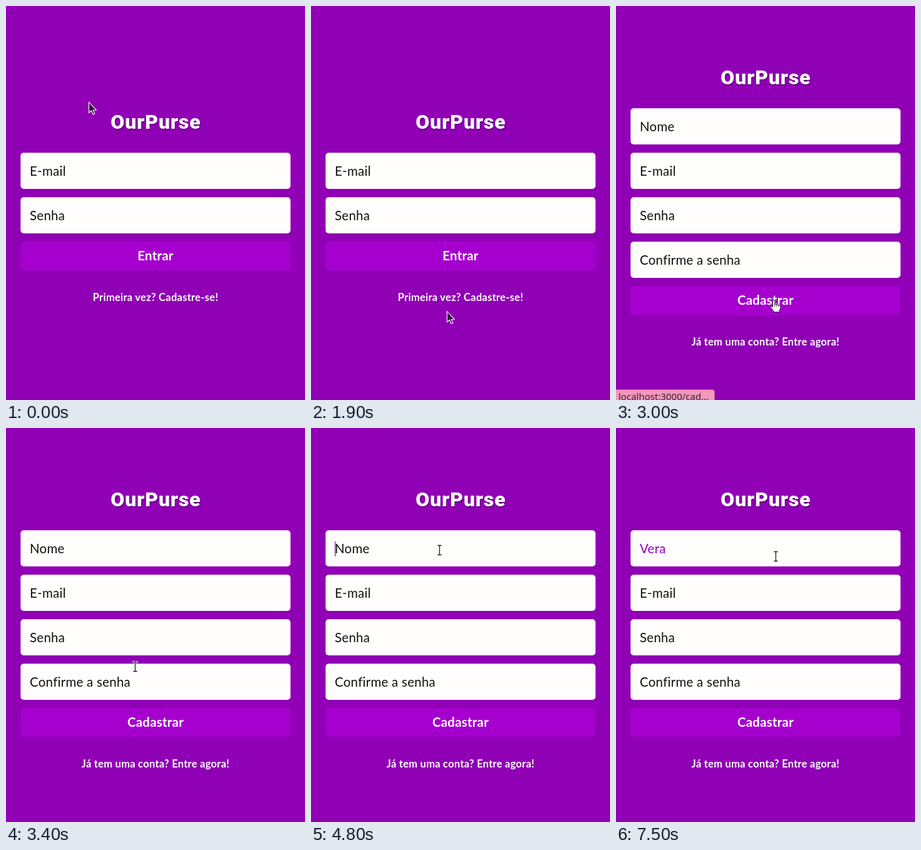
An HTML page that plays this animation: 478x629 px, repeating every 8 s.

```html
<!DOCTYPE html>
<html lang="pt-BR">
<head>
<meta charset="utf-8">
<title>OurPurse</title>
<style>
  html, body { margin: 0; width: 100%; height: 100%; overflow: hidden; background: #9000b5; }
  svg { display: block; width: 100%; height: 100%; }
  text { white-space: pre; }
  .title { font: 900 32px Roboto, sans-serif; letter-spacing: .9px; fill: #fff; text-anchor: middle; text-shadow: 1px 2px 1px rgba(40, 0, 60, .4); }
  .label { font: 400 20.5px Lato, sans-serif; letter-spacing: .012em; fill: #111; }
  .label.typed { fill: #9500b8; }
  .button { font: 700 20.5px Lato, sans-serif; letter-spacing: .01em; fill: #fff; text-anchor: middle; }
  .link { font: 700 16.5px Lato, sans-serif; letter-spacing: .016em; fill: #fff; text-anchor: middle; }
  .status { font: 400 15px "Noto Sans", sans-serif; fill: #3c2035; }
</style>
</head>
<body>
<svg id="stage" viewBox="0 0 478 629">
  <rect width="478" height="629" fill="#9000b5"/>
  <g id="login"></g>
  <g id="signup"></g>
  <rect id="caret" x="38" width="1.2" height="24" fill="#9000b5"/>
  <g id="status">
    <path d="M-1 612.5H154Q157.500 612.5 157.500 616V630H-1Z" fill="#f397bd" stroke="#b8609c"/>
    <text class="status" x="4" y="629">localhost:3000/cad…</text>
  </g>
  <g id="pointer">
    <path id="arrow" d="M.5 .5V17.700L4.400 14.200L7.100 20.100L9.800 18.900L7.200 13.200H12.300Z" fill="#2b1b2e" stroke="#fff" stroke-width="1.100" stroke-linejoin="round"/>
    <g id="hand" transform="scale(1.06)" stroke="#2b1b2e" stroke-width=".9" stroke-linejoin="round" stroke-linecap="round">
      <path d="M-1.700 1.500Q-1.600 .1 0 .1T1.700 1.500V6.500Q3.300 5.400 4.600 6.900Q6.300 6 7.500 7.500Q10.200 7 10.300 9.500V12.500L8.800 15.500V18H-.2V16L-4.500 11.200Q-5.300 9.300 -3.600 9L-1.700 10.500Z" fill="#fff"/>
      <path d="M1.700 6.500V9.500M4.600 7V9.500M7.500 7.600V9.800" fill="none"/>
    </g>
    <g id="beam" fill="none" stroke-linecap="square">
      <path d="M-2.500 -7.500H2.500M-2.500 7.500H2.500M0 -7V7" stroke="#fff" stroke-width="3"/>
      <path d="M-2.500 -7.500H2.500M-2.500 7.500H2.500M0 -7V7" stroke="#1c1c1c" stroke-width="1.300"/>
    </g>
  </g>
</svg>
<script>
const LOOP = 8000, STEP = 100, LEFT = 38;
const $ = id => document.getElementById(id);

function add(parent, tag, attrs, text) {
  const el = document.createElementNS('http://www.w3.org/2000/svg', tag);
  for (const key in attrs) el.setAttribute(key, attrs[key]);
  if (text) el.textContent = text;
  parent.append(el);
  return el;
}

// Builds one form whose first field starts at y; returns the field labels.
function form(group, y, fields, action, link) {
  const box = (top, height, fill) =>
    add(group, 'rect', { x: 23.3, y: top + .3, width: 431.5, height: height - .4, rx: 5, fill });
  add(group, 'text', { class: 'title', x: 239.5, y: y - 38.5 }, 'OurPurse');
  const labels = fields.map((name, i) => {
    const top = y + i * 71;
    box(top, 58, '#fffefd');
    return add(group, 'text', { class: 'label', x: LEFT, y: top + 37 }, name);
  });
  const end = y + fields.length * 71;
  box(end, 46, '#a600cf');
  add(group, 'text', { class: 'button', x: 239, y: end + 30 }, action);
  add(group, 'text', { class: 'link', x: 239, y: end + 95 }, link);
  return labels;
}

form($('login'), 234, ['E-mail', 'Senha'], 'Entrar', 'Primeira vez? Cadastre-se!');
const [nameLabel] = form($('signup'), 163, ['Nome', 'E-mail', 'Senha', 'Confirme a senha'],
  'Cadastrar', 'Já tem uma conta? Entre agora!');

// Pointer moves: start, steps, shape, end point, optional curve control.
const moves = [
  { at: 0, n: 1, shape: 'arrow', to: [132, 153] },
  { at: 300, n: 1, shape: 'arrow', to: [131, 152] },
  { at: 1200, n: 4, shape: 'arrow', to: [134, 285], via: [89, 210] },
  { at: 1700, n: 1, shape: 'hand', to: [172, 399] },
  { at: 1900, n: 1, shape: 'arrow', to: [217, 487] },
  { at: 2000, n: 3, shape: 'arrow', to: [236, 480] },
  { at: 2400, n: 1, shape: 'hand', to: [252, 469.5] },
  { at: 3200, n: 1, shape: 'hand', to: [241, 450] },
  { at: 3300, n: 2, shape: 'beam', to: [206.5, 381] },
  { at: 3500, n: 6, shape: 'beam', to: [206, 199], via: [202, 230] },
  { at: 4800, n: 1, shape: 'beam', to: [205.5, 195] },
  { at: 4900, n: 3, shape: 'beam', to: [255.5, 205] }
];

function pointerAt(t) {
  let i = moves.length - 1;
  while (moves[i].at > t) i--;
  const { at, n, shape, to, via } = moves[i];
  const from = i ? moves[i - 1].to : to;
  const u = Math.min(n, Math.floor((t - at) / STEP) + 1) / n;
  const pos = to.map((end, k) => {
    const mid = via ? via[k] : (from[k] + end) / 2;
    return (1 - u) ** 2 * from[k] + 2 * u * (1 - u) * mid + u * u * end;
  });
  return { shape, pos };
}

const between = (t, a, b) => t >= a && t < b;

function typedAt(t) {
  return 'Vera'.slice(0, t < 6000 ? 0 : t < 6200 ? 1 : t < 6400 ? 2 : 4);
}

function draw(t) {
  const joined = t >= 3000;
  $('login').style.display = joined ? 'none' : '';
  $('signup').style.display = joined ? '' : 'none';

  const typed = typedAt(t);
  nameLabel.textContent = typed || 'Nome';
  nameLabel.classList.toggle('typed', !!typed);

  const onEmail = t >= 6900;
  const caretOn = between(t, 3800, 4300) || between(t, 4800, 5500) || between(t, 6000, 7500);
  $('caret').style.display = caretOn ? '' : 'none';
  $('caret').setAttribute('x', LEFT + (typed && !onEmail ? nameLabel.getComputedTextLength() : 0));
  $('caret').setAttribute('y', onEmail ? 252 : 181);

  $('status').style.opacity = between(t, 2700, 3300) ? 1 : between(t, 2500, 2700) ? .5 : 0;

  const { shape, pos } = pointerAt(t);
  for (const id of ['arrow', 'hand', 'beam']) $(id).style.display = id === shape ? '' : 'none';
  $('pointer').setAttribute('transform', `translate(${pos})`);
}

const start = performance.now();
function tick() {
  draw((performance.now() - start) % LOOP);
  requestAnimationFrame(tick);
}
tick();
</script>
</body>
</html>
```
